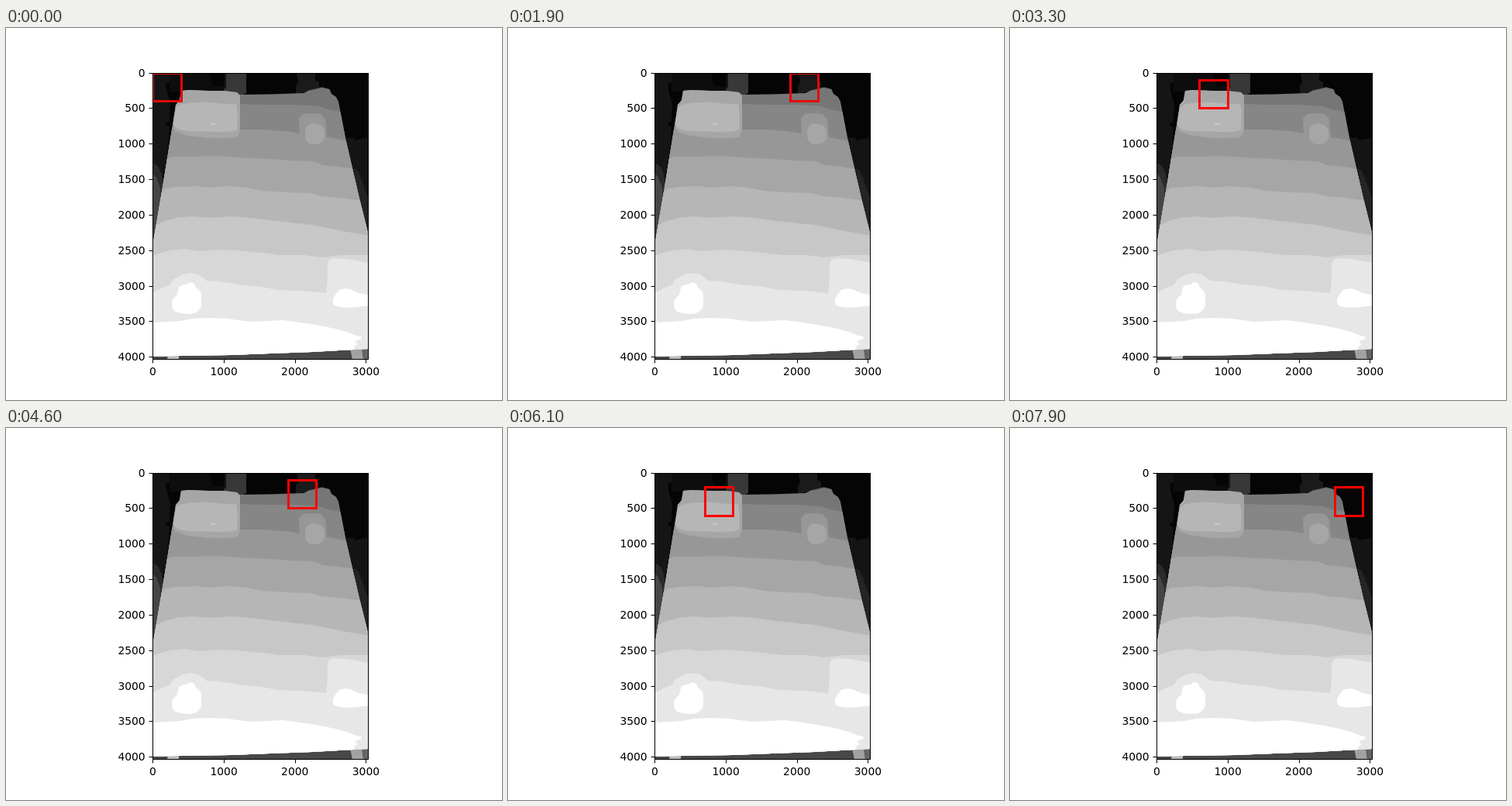
These frames come from a looping animation (640x480 px, 8 s). An HTML page:

```html
<!DOCTYPE html>
<html lang="en">
<head>
<meta charset="utf-8">
<title>Sliding window over a depth map</title>
<style>
  html, body { margin: 0; width: 100%; height: 100%; overflow: hidden; background: #fff; }
  svg { display: block; width: 640px; height: 480px; }
  text { font: 13.889px "DejaVu Sans", sans-serif; fill: #000; }
  .axis { fill: none; stroke: #000; stroke-width: 1; }
</style>
</head>
<body>
<svg viewBox="0 0 640 480">
  <defs>
    <clipPath id="frame"><rect x="189" y="58" width="279" height="370"/></clipPath>
    <clipPath id="body">
      <path d="M189 282L190 276L203 199L212 143L217 113L219 99L224 93L226 81L236 80L262 81L281 81L298 83L301 86L340 85.500L384 84L390 81L400 79L407 77L417 79L420 85L426 89L429 95L438 142L456 220L468 268V414L430 416L395 418L340 420L290 422L225 423L189 424Z"/>
    </clipPath>
  </defs>

  <g clip-path="url(#frame)">
    <!-- dark surroundings -->
    <path fill="#050505" d="M189 58H468V428H189Z"/>
    <path fill="#151515" d="M189 58H211V70L206 72L207 80L210 91L212 98L211 121L206 123V126L211 127L208 165L200 210L189 230Z"/>
    <path fill="#2b2b2b" d="M189 174L196 178L201 188L203 200L196 240H189Z"/>
    <path fill="#464646" d="M189 187L194 193L199 206L199 225L189 290Z"/>
    <path fill="#0d0d0d" d="M211 58H262L266 74L281 76V82H211Z"/>
    <path fill="#151515" d="M282 58H285V82H281Z"/>
    <path fill="#383838" d="M284 58H310V84L302 88L282 81L281 79L284 77Z"/>
    <path fill="#1a1a1a" d="M375 58H399V67L404 70V79L374 85V74L377 70Z"/>
    <path fill="#404040" d="M385 85L391 80L404 77L408 76L418 79L420 86Z"/>
    <path fill="#141414" d="M437 142L448 141L450 145L468 141V270H450Z"/>
    <path fill="#242424" d="M449 180L455 186L462 205L468 221V270H460Z"/>
    <path fill="#484848" d="M189 421L468 411V428H189Z"/>
    <path fill="#bdbdbd" d="M209 423H223V427H208Z"/>
    <path fill="#a2a2a2" d="M444 413H459L461 428H447Z"/>
    <path fill="#656565" d="M460 413H468V428H461Z"/>

    <!-- depth bands, far to near -->
    <g clip-path="url(#body)">
      <path fill="#767676" d="M189 58H468V428H189Z"/>
      <path fill="#868686" d="M189 98H302L330 99L375 99L390 100L404 101L415 105L432 108L470 110V430H180Z"/>
      <path fill="#979797" d="M189 128H302V131L330 131L360 133L379 136L378 117L383 111L395 110L406 111L412 118L414 141L426 143L440 146L470 148V430H180Z"/>
      <path fill="#a6a6a6" d="M180 172L209 168L216 166L240 166L275 165L300 167L340 169L370 171L397 172L409 177L422 178L450 182L470 184V430H180Z"/>
      <path fill="#b6b6b6" d="M180 216L201 212L206 207L222 205L245 204L262 206L285 204L310 206L330 210L360 212L393 213L407 217L430 219L470 224V430H180Z"/>
      <path fill="#c7c7c7" d="M180 259L194 254L205 249L220 245L240 243L262 245L290 243L315 245L340 248L375 252L395 254L415 258L440 263L470 268V430H180Z"/>
      <path fill="#d7d7d7" d="M180 297L190 294L200 290L212 287L230 285L250 288L275 286L300 287L330 290L355 293L385 293L408 296L432 293L470 293V430H180Z"/>
      <path fill="#e7e7e7" d="M180 343L190 341L200 336L212 331L215 325L222 321L228 318L236 316L248 318L255 323L258 326L275 327L300 331L330 334L350 338L380 339L413 342L415 325L415 305L417 299L423 297L440 298L470 303V430H180Z"/>
      <path fill="#fff" d="M180 380L210 379L225 378L240 375L262 374L285 375L300 377L315 379L340 378L357 377L380 380L405 384L425 388L440 392L452 397L458 398L459 401L450 404L454 408L449 411L450 416V430H180Z"/>
      <path fill="#fff" d="M223 335Q224 331 233 331Q237 326 243 330L245 335Q252 339 252 346V358Q249 368 238 369Q221 369 216 364Q213 359 215 350L221 344Z"/>
      <path fill="#fff" d="M430 338Q437 335 444 337L455 342L470 345V358L452 360Q434 362 424 358Q420 354 423 347Z"/>

      <!-- raised patches -->
      <path fill="#a6a6a6" d="M219 81L226 78H301L302 90V128Q302 138 297 141Q280 143 262 142L234 139L220 134Q213 128 217 113L219 99L224 93Z"/>
      <path fill="#b6b6b6" d="M217 113L220 102L225 99Q240 95 264 96L283 98H297Q300 112 298 131Q292 135 272 134L236 133Q219 132 216 125Z"/>
      <path fill="#cacaca" d="M263 124L266 123H270L271 125H264Z"/>
      <path fill="#a6a6a6" d="M386 135Q386 124 396 123Q408 123 411 133V141Q409 150 398 150Q387 150 386 140Z"/>
    </g>

    <rect id="window" fill="none" stroke-width="3"/>
  </g>

  <g id="axes" class="axis"><path d="M189.500 58.500H467.500V427.500H189.500Z"/></g>
  <g id="labels"></g>
</svg>

<script>
  const LEFT = 189.4, TOP = 57.6, SCALE = 369.6 / 4032;
  const SIZE = 400, STRIDE = 100, COLS = 27, STEP_MS = 100, LOOP_MS = 8000;
  const NS = "http://www.w3.org/2000/svg";
  const snap = v => Math.floor(v + 0.5) + 0.5;
  const px = x => LEFT + x * SCALE;
  const py = y => TOP + y * SCALE;

  function add(parent, tag, attrs, text = "") {
    const el = document.createElementNS(NS, tag);
    for (const key in attrs) el.setAttribute(key, attrs[key]);
    el.textContent = text;
    document.getElementById(parent).append(el);
  }

  for (let v = 0; v <= 4000; v += 500) {
    add("axes", "path", { d: `M184.5 ${snap(py(v))}H189.5` });
    add("labels", "text", { x: 179.7, y: Math.round(py(v) + 5), "text-anchor": "end" }, v);
  }
  for (let v = 0; v <= 3000; v += 1000) {
    add("axes", "path", { d: `M${snap(px(v))} 427.5V432.5` });
    add("labels", "text", { x: px(v), y: 448, "text-anchor": "middle" }, v);
  }

  const box = document.getElementById("window");
  const start = performance.now();

  function draw(now) {
    const step = Math.floor((Math.max(0, now - start) % LOOP_MS) / STEP_MS);
    const row = Math.floor(step / COLS);
    const x = (step % COLS) * STRIDE, y = row * STRIDE;
    const x0 = snap(px(x)), y0 = snap(py(y));
    box.setAttribute("x", x0);
    box.setAttribute("y", y0);
    box.setAttribute("width", snap(px(x + SIZE)) - x0);
    box.setAttribute("height", snap(py(y + SIZE)) - y0);
    box.setAttribute("stroke", row ? "#ff0000" : "#e60808");
    requestAnimationFrame(draw);
  }
  draw(start);
</script>
</body>
</html>
```
